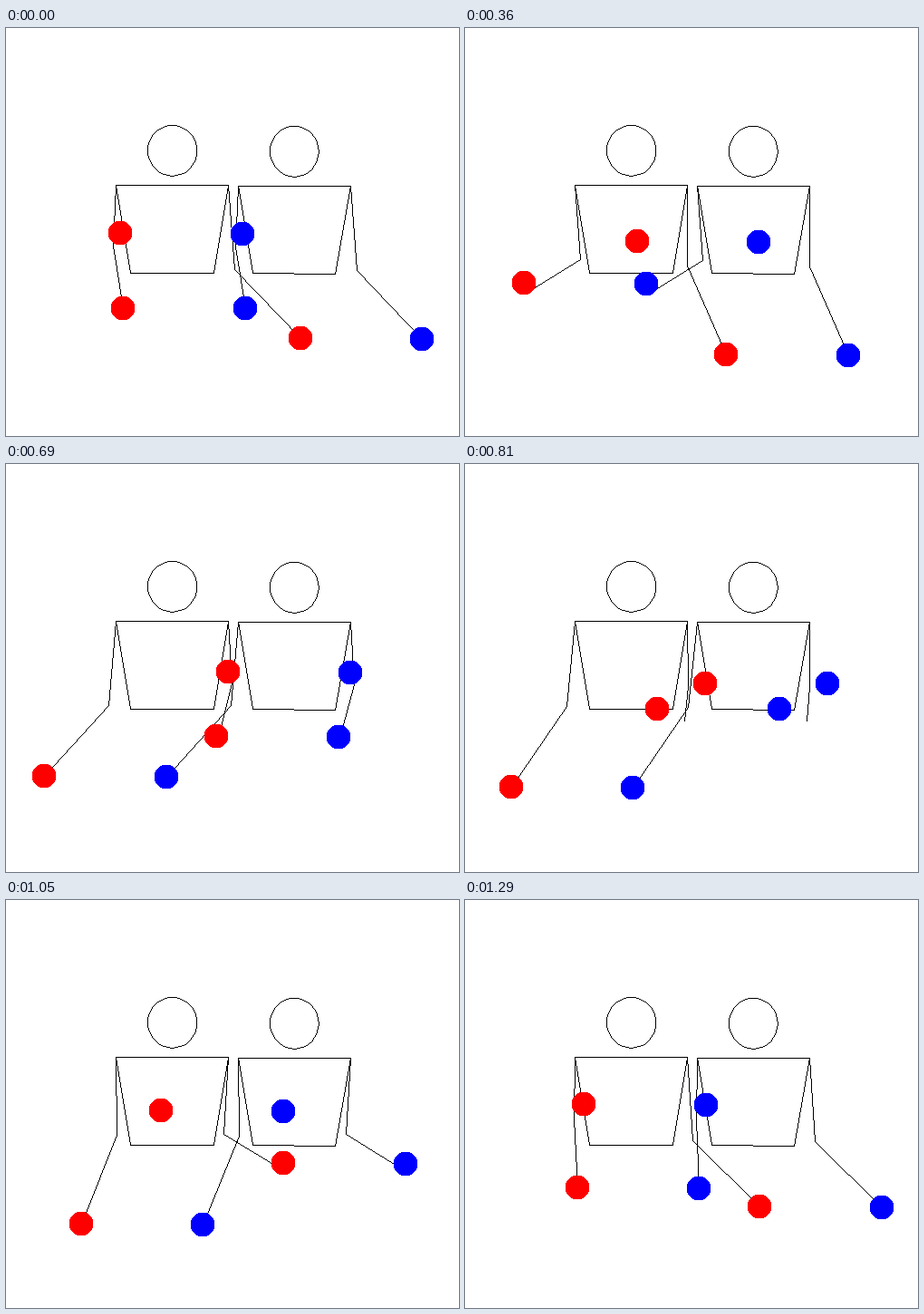
Write an HTML page with a canvas that moves like this. It is 500x450 px and loops after 1320 ms.

```html
<!DOCTYPE html>
<html lang="en">
<head>
<meta charset="utf-8">
<title>Two jugglers</title>
<style>
  html, body { margin: 0; width: 100%; height: 100%; overflow: hidden; background: #fff; }
  canvas { display: block; }
</style>
</head>
<body>
<canvas id="stage" width="500" height="450"></canvas>
<script>
const ctx = document.getElementById('stage').getContext('2d');

// Time is counted in steps of 30 ms
const STEP = 30, CYCLE = 44, FLIGHT = 37.3, CATCH = FLIGHT - CYCLE / 2;

// Pixels per cm, and the tilted camera's factors for height and depth
const SCALE = 2.692, UP = SCALE * 0.8, DEPTH = SCALE * 0.6;
const ARM = 41, REACH = 30;
const SHOULDER = 23 * SCALE, WAIST = 17 * SCALE, WAIST_Y = 96.85;
const HEAD_W = 10 * SCALE, HEAD_H = 13 * UP, HEAD_Y = -38.3;
const CENTER = 183.56, TOP = 173.1, SLOPE = 0.006, RADIUS = 13.3;

// Hand and ball points: u outward from the body's axis, y below the shoulders
const THROW_U = 54.13, VU = 5.058, CATCH_U = VU * FLIGHT - THROW_U;
const HAND_Y = 135.8, APEX = 50.9;
const GRAVITY = (HAND_Y - APEX) / (FLIGHT / 2) ** 2;
const VY = GRAVITY * FLIGHT;
const CATCH_VU = 3.12, CATCH_VY = 5.4;

const jugglers = [
  { x: CENTER, color: '#f00' },
  { x: CENTER + 134.65, color: '#00f' }
];

function hermite(a, va, b, vb, s, span) {
  const s2 = s * s, s3 = s2 * s;
  return a + (b - a) * (3 * s2 - 2 * s3) +
    span * (va * (s - 2 * s2 + s3) + vb * (s3 - s2));
}

function handAt(p) {
  if (p < CATCH) {
    const s = p / CATCH;
    return {
      u: hermite(THROW_U, -VU, CATCH_U, CATCH_VU, s, CATCH),
      y: hermite(HAND_Y, -VY, HAND_Y, CATCH_VY, s, CATCH)
    };
  }
  const span = CYCLE - CATCH, s = (p - CATCH) / span;
  return {
    u: hermite(CATCH_U, CATCH_VU, THROW_U, -VU, s, span),
    y: hermite(HAND_Y, CATCH_VY, HAND_Y, -VY, s, span)
  };
}

function flightAt(p) {
  return { u: THROW_U - VU * p, y: APEX + GRAVITY * (p - FLIGHT / 2) ** 2 };
}

// The elbow hangs in the vertical plane through shoulder and hand
function elbowOf(hand) {
  const du = (hand.u - SHOULDER) / SCALE;
  const drop = (hand.y - REACH * DEPTH) / UP;
  const flat = Math.hypot(du, REACH), dist = Math.hypot(flat, drop);
  const bend = Math.sqrt(Math.max(0, ARM * ARM - dist * dist / 4));
  const f = 0.5 - bend * drop / dist / flat;
  const down = drop / 2 + bend * flat / dist;
  return { u: SHOULDER + du * f * SCALE, y: down * UP + REACH * f * DEPTH };
}

function project(body, side, pt) {
  const x = body.x + side * pt.u;
  return [Math.floor(x), Math.round(TOP + pt.y + SLOPE * (x - CENTER))];
}

function line([x0, y0], [x1, y1]) {
  const dx = x1 - x0, dy = y1 - y0;
  const n = Math.max(Math.abs(dx), Math.abs(dy), 1);
  for (let i = 0; i <= n; i++) {
    ctx.fillRect(Math.round(x0 + dx * i / n), Math.round(y0 + dy * i / n), 1, 1);
  }
}

function path(pts) {
  for (let i = 1; i < pts.length; i++) line(pts[i - 1], pts[i]);
}

function disc([x, y]) {
  for (let r = -13; r < 13; r++) {
    const w = Math.round(Math.sqrt(RADIUS ** 2 - (r + 0.5) ** 2));
    ctx.fillRect(x - w, y + r, 2 * w, 1);
  }
}

function drawBody(body) {
  const at = (side, u, y) => project(body, side, { u, y });
  path([
    at(-1, SHOULDER, 0), at(1, SHOULDER, 0), at(1, WAIST, WAIST_Y),
    at(-1, WAIST, WAIST_Y), at(-1, SHOULDER, 0)
  ]);
  const head = [];
  for (let i = 0; i <= 40; i++) {
    const a = i * Math.PI / 20;
    head.push(at(1, HEAD_W * Math.cos(a), HEAD_Y + HEAD_H * Math.sin(a)));
  }
  path(head);
}

function draw(k) {
  ctx.fillStyle = '#fff';
  ctx.fillRect(0, 0, 500, 450);
  const balls = [];
  ctx.fillStyle = '#000';
  for (const body of jugglers) {
    drawBody(body);
    for (const side of [-1, 1]) {
      const p = side < 0 ? k : (k + CYCLE / 2) % CYCLE;
      const hand = handAt(p), tip = project(body, side, hand);
      path([project(body, side, { u: SHOULDER, y: 0 }), project(body, side, elbowOf(hand)), tip]);
      if (p > CATCH) balls.push([body.color, tip]);
      if (p <= FLIGHT) balls.push([body.color, project(body, side, flightAt(p))]);
    }
  }
  for (const [color, pos] of balls) {
    ctx.fillStyle = color;
    disc(pos);
  }
}

const start = performance.now();
function tick() {
  draw(Math.floor((performance.now() - start) / STEP) % CYCLE);
  requestAnimationFrame(tick);
}
tick();
</script>
</body>
</html>
```
